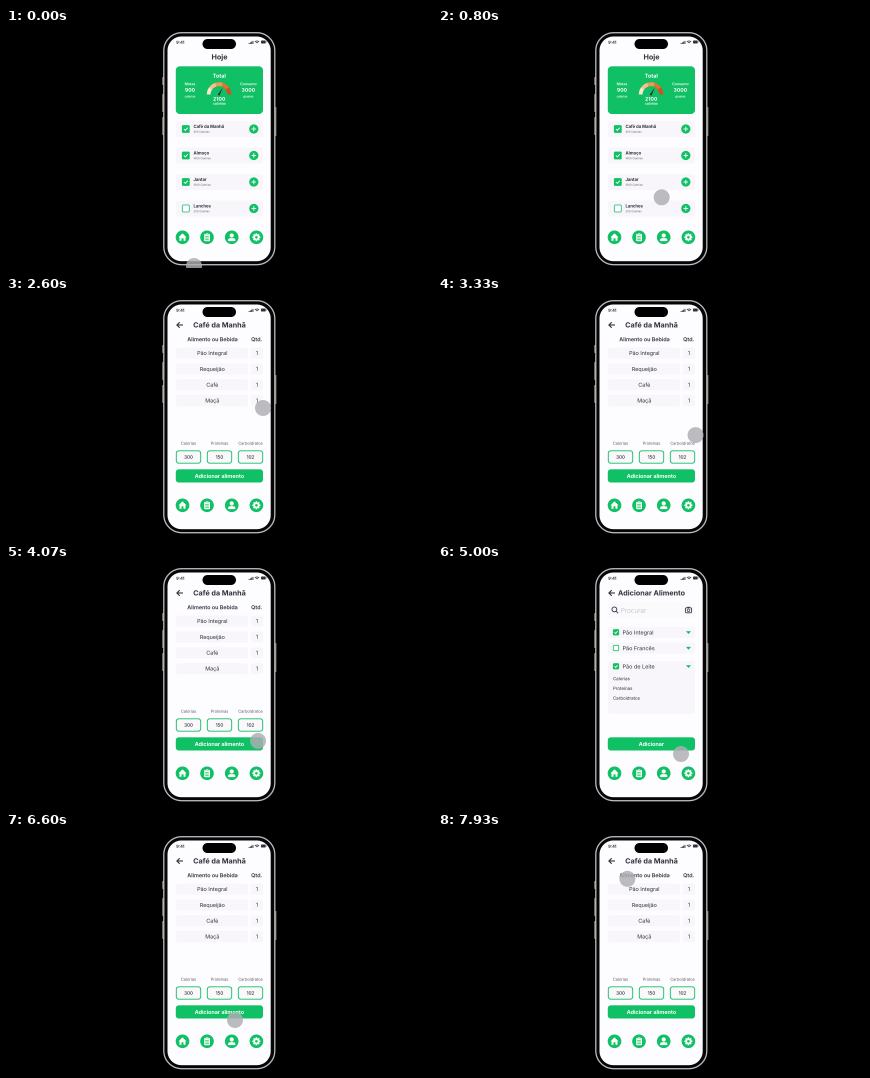
These frames come from a looping animation (426 by 240 pixels, 8000 ms). An HTML page with a canvas:

```html
<!DOCTYPE html>
<html lang="pt">
<head>
<meta charset="utf-8">
<title>Hoje</title>
<style>
html, body { margin: 0; width: 100%; height: 100%; overflow: hidden; background: #000; }
canvas { display: block; width: 100vw; height: 100vh; }
</style>
</head>
<body>
<canvas id="stage"></canvas>
<script>
const W = 426, H = 240, LOOP = 8000, FPS = 15, DETAIL = 4;
const GREEN = '#0fc064', INK = '#30323c', GREY = '#5c5c66', PALE = '#f8f6fa', PAPER = '#fdfcff';
const canvas = document.getElementById('stage');
const view = canvas.getContext('2d');
// Drawn large and scaled down, so that small text keeps its shape
const sheet = document.createElement('canvas');
sheet.width = W * DETAIL;
sheet.height = H * DETAIL;
const ctx = sheet.getContext('2d');
ctx.scale(DETAIL, DETAIL);

function box(x, y, w, h, r, fill, stroke, lw = 1) {
  ctx.beginPath();
  ctx.roundRect(x, y, w, h, r);
  if (fill) { ctx.fillStyle = fill; ctx.fill(); }
  if (stroke) { ctx.strokeStyle = stroke; ctx.lineWidth = lw; ctx.stroke(); }
}

function disc(x, y, r, fill) {
  ctx.beginPath();
  ctx.arc(x, y, r, 0, Math.PI * 2);
  ctx.fillStyle = fill;
  ctx.fill();
}

function path(points, color, lw, fill = false) {
  ctx.beginPath();
  points.forEach(([x, y], i) => i ? ctx.lineTo(x, y) : ctx.moveTo(x, y));
  if (fill) {
    ctx.closePath();
    ctx.fillStyle = color;
    ctx.fill();
    return;
  }
  ctx.strokeStyle = color;
  ctx.lineWidth = lw;
  ctx.stroke();
}

function arc(x, y, r, from, to, color, lw) {
  ctx.beginPath();
  ctx.arc(x, y, r, from * Math.PI, to * Math.PI);
  ctx.strokeStyle = color;
  ctx.lineWidth = lw;
  ctx.stroke();
}

// y is the middle of the capitals
function text(str, x, y, size, weight = 400, color = INK, align = 'center') {
  ctx.font = `${weight} ${size}px Inter, sans-serif`;
  ctx.textAlign = align;
  ctx.fillStyle = color;
  ctx.fillText(str, x, y + size * 0.36);
}

function checkbox(x, y, size, on) {
  const h = size / 2;
  if (!on) return box(x - h + .4, y - h + .4, size - .8, size - .8, 1, '#fff', GREEN, .8);
  box(x - h, y - h, size, size, 1.2, GREEN);
  path([[x - size * .24, y], [x - size * .06, y + size * .18], [x + size * .26, y - size * .17]], '#fff', .9);
}

function button(label) {
  box(169.8, 173.3, 87.2, 13.2, 3, GREEN);
  text(label, 213.4, 180, 5.4, 700, '#fff');
}

function title(label, back) {
  text(label, 213.5, 28.8, 7.2, 700);
  if (!back) return;
  path([[177, 29], [171, 29]], INK, 1.1);
  path([[173.7, 26.2], [170.9, 29], [173.7, 31.8]], INK, 1.1);
}

function phone() {
  const metal = '#8d866b';
  [[49, 8], [66, 18], [89, 18]].forEach(([y, h]) => box(156.2, y, 1.6, h, .6, metal));
  box(268.8, 79, 1.6, 29, .6, metal);
  box(157.8, 4.7, 111, 232, 18, '#050507', '#bdbbc0', 1.3);
  box(161.5, 8.5, 103.2, 224.7, 14, PAPER);
  box(196.5, 11, 33.5, 10, 5, '#000');
}

function statusBar() {
  text('9:41', 174.3, 14.2, 4, 700);
  for (let i = 0; i < 4; i++) box(242.6 + i * 1.3, 15 - i * .7, .9, 1 + i * .7, .2, INK);
  arc(251, 16, 3, 1.25, 1.75, INK, .8);
  arc(251, 16, 1.5, 1.25, 1.75, INK, .8);
  box(255, 12.5, 4.7, 3, .8, INK);
  box(260, 13.4, .5, 1.2, .2, INK);
}

function navBar() {
  const y = 209.3;
  [176.5, 201, 225.7, 250.4].forEach(x => disc(x, y, 6.8, GREEN));
  path([[172.5, y], [176.5, y - 4], [180.5, y], [179.5, y], [179.5, y + 3.5], [177.5, y + 3.5],
    [177.5, y + 1], [175.5, y + 1], [175.5, y + 3.5], [173.5, y + 3.5], [173.5, y]], '#fff', 0, true);
  box(198.2, y - 3.4, 5.8, 7.3, .8, '#fff');
  box(199.8, y - 4.1, 2.6, 1.5, .5, '#fff', GREEN, .3);
  [-1, .7, 2.4].forEach(d => path([[199.2, y + d], [202.8, y + d]], GREEN, .7));
  disc(225.7, y - 1.8, 2.1, '#fff');
  box(222, y + .9, 7.4, 2.9, [2, 2, .7, .7], '#fff');
  for (let i = 0; i < 8; i++) {
    const a = i * Math.PI / 4;
    path([[250.4, y], [250.4 + 4 * Math.cos(a), y + 4 * Math.sin(a)]], '#fff', 1.6);
  }
  disc(250.4, y, 3.1, '#fff');
  disc(250.4, y, 1.3, GREEN);
}

function gauge() {
  const x = 213, y = 66.5, bands = ['#f8e6cf', '#f5c08c', '#f29a55', '#ee6d2f', '#dd4a20'];
  bands.forEach((c, i) => arc(x, y, 10.3, 1 + i / 5, 1 + (i + 1) / 5, c, 3.8));
  path([[x - 1, y - .2], [x + 3.7, y - 7], [x + .8, y + .5]], '#30302c', 0, true);
  disc(x, y, 1, '#30302c');
}

function stat(x, label, value, unit) {
  text(label, x, 56, 3.6, 600, '#fff');
  text(value, x, 62, 5.1, 700, '#fff');
  text(unit, x, 68.6, 2.8, 600, '#fff');
}

function home() {
  title('Hoje');
  box(169.8, 38.3, 87.2, 47.7, 4, GREEN);
  text('Total', 213.3, 47.8, 5.4, 700, '#fff');
  stat(184, 'Metas', '900', 'calorias');
  stat(242.3, 'Consumo', '3000', 'gramas');
  gauge();
  text('2100', 213.2, 71, 5.1, 700, '#fff');
  text('calorias', 213.3, 75.5, 3.4, 600, '#fff');
  const meals = [['Café da Manhã', '350 Calorias'], ['Almoço', '1000 Calorias'],
    ['Jantar', '1000 Calorias'], ['Lanches', '200 Calorias']];
  meals.forEach(([name, info], i) => {
    const y = 101 + i * 26.5;
    box(170, y - 8, 87, 16, 2, PALE);
    checkbox(179.8, y, 7.8, i < 3);
    text(name, 187.5, y - 2.5, 4.2, 700, INK, 'left');
    text(info, 187.5, y + 2.8, 2.7, 400, GREY, 'left');
    disc(247.8, y, 4.6, GREEN);
    path([[245.5, y], [250.1, y]], '#fff', .9);
    path([[247.8, y - 2.3], [247.8, y + 2.3]], '#fff', .9);
  });
}

function meal() {
  title('Café da Manhã', true);
  text('Alimento ou Bebida', 206.5, 43.2, 5.4, 600);
  text('Qtd.', 250.7, 43.2, 5.4, 600);
  ['Pão Integral', 'Requeijão', 'Café', 'Maçã'].forEach((food, i) => {
    const y = 57.1 + i * 15.85;
    box(170, y - 5.5, 72, 11, 2, PALE);
    box(245, y - 5.5, 12, 11, 2, PALE);
    text(food, 206.3, y, 5.4, 400);
    text('1', 251, y, 5.2, 400);
  });
  [['Calorias', '300'], ['Proteínas', '150'], ['Carboidratos', '102']].forEach(([name, value], i) => {
    const x = 182.5 + i * 31;
    text(name, x, 147.2, 4, 400, GREY);
    box(x - 12.2, 154.8, 24.4, 12.4, 2.5, '#faf8fa', GREEN, .9);
    text(value, x, 161, 4.6, 500);
  });
  button('Adicionar alimento');
}

function search() {
  const line = '#3a3c50';
  box(170, 38.5, 87, 15, 3, '#faf9fc');
  arc(176.4, 45.4, 2.4, 0, 2, line, .9);
  path([[178.1, 47.1], [180.2, 49.2]], line, .9);
  text('Procurar', 182.8, 46.4, 6.4, 300, '#b8b8c0', 'left');
  box(247.4, 43.8, 6.2, 5, 1, null, line, .9);
  path([[249.2, 43.3], [251.8, 43.3]], line, 1);
  arc(250.5, 46.3, 1.3, 0, 2, line, .8);
}

function addFood() {
  title('Adicionar Alimento', true);
  search();
  const foods = [['Pão Integral', 68.5, 11], ['Pão Francês', 84.2, 11], ['Pão de Leite', 102.5, 53]];
  foods.forEach(([food, y, h], i) => {
    box(170, y - 5.5, 87, h, 2, PALE);
    checkbox(178, y - .2, 6.2, i !== 1);
    text(food, 184.5, y, 5.5, 400, INK, 'left');
    path([[248, y - 1.3], [253, y - 1.3], [250.5, y + 1.5]], GREEN, 0, true);
  });
  ['Calorias', 'Proteínas', 'Carboidratos'].forEach((name, i) =>
    text(name, 175, 114.7 + i * 9.7, 4.4, 400, INK, 'left'));
  button('Adicionar');
}

// [time, x, y]
const route = [[0, 188, 238], [300, 192, 231], [1200, 249, 120], [1530, 251, 113], [1900, 248, 104],
  [2200, 251, 106], [2600, 257, 112], [3200, 258, 135], [3800, 254, 172], [4070, 252, 177],
  [4350, 248, 181], [5000, 243, 190], [5600, 233, 184], [6000, 230, 182], [6600, 229, 188],
  [7300, 211, 108], [7930, 187, 40], [8000, 185, 37]];

function pointer(t) {
  const i = Math.max(1, route.findIndex(p => p[0] >= t));
  const a = route[i - 1], b = route[i];
  const k = (t - a[0]) / (b[0] - a[0]);
  disc(a[1] + (b[1] - a[1]) * k, a[2] + (b[2] - a[2]) * k, 8, 'rgba(174,174,178,.82)');
}

function screenAt(t) {
  if (t < 2000) return home;
  return t >= 4400 && t < 6130 ? addFood : meal;
}

function draw(now) {
  const t = Math.floor((now % LOOP) * FPS / 1000 + .01) * 1000 / FPS;
  ctx.fillStyle = '#000';
  ctx.fillRect(0, 0, W, H);
  phone();
  statusBar();
  screenAt(t)();
  navBar();
  pointer(t);

  const dpr = window.devicePixelRatio || 1;
  const w = Math.round(innerWidth * dpr), h = Math.round(innerHeight * dpr);
  if (canvas.width !== w || canvas.height !== h) {
    canvas.width = w;
    canvas.height = h;
  }
  view.imageSmoothingQuality = 'high';
  view.drawImage(sheet, 0, 0, w, h);
}

const start = performance.now();
function tick() {
  draw(performance.now() - start);
  requestAnimationFrame(tick);
}
tick();
</script>
</body>
</html>
```
